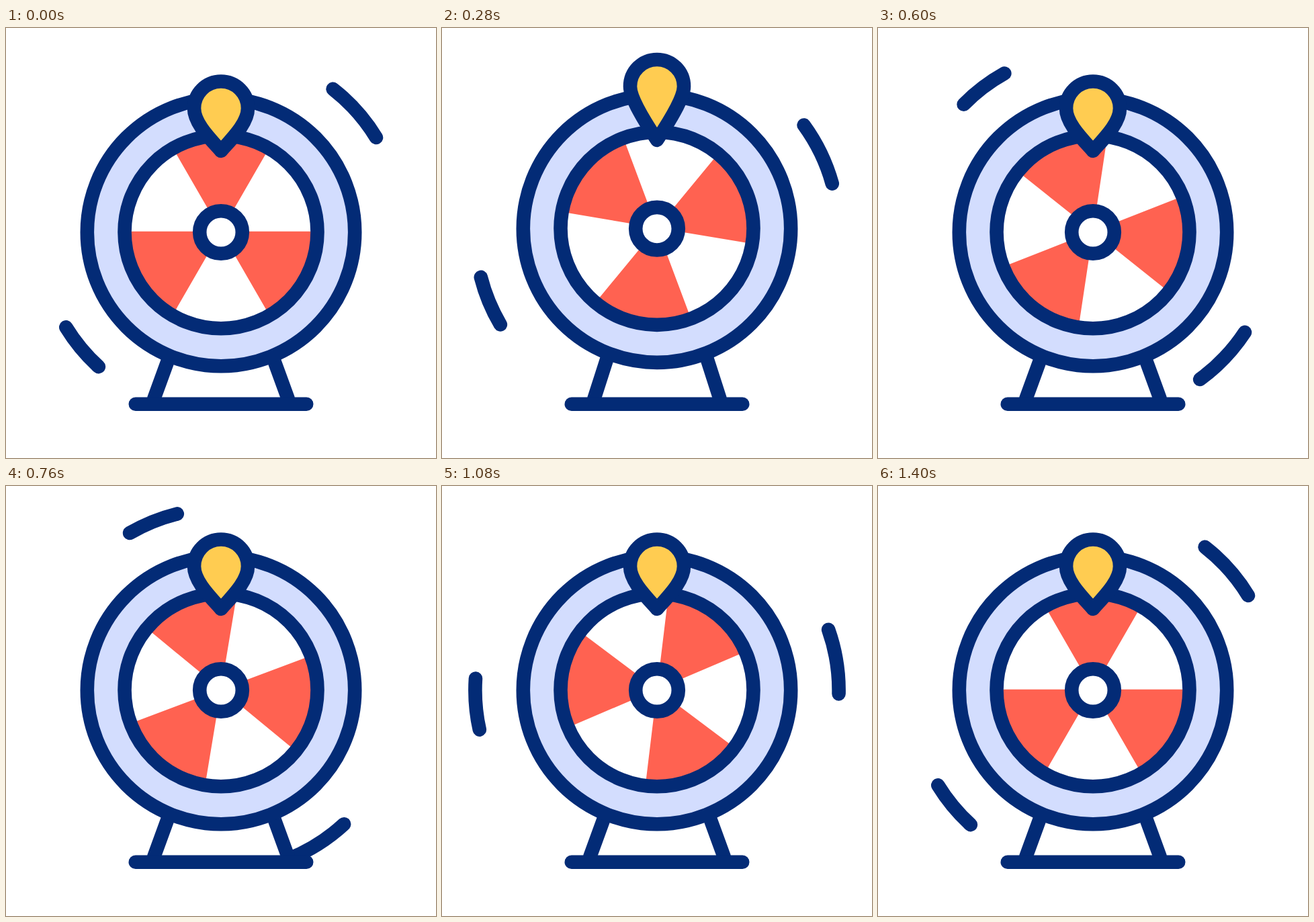
Animation of 640 by 640 pixels, one loop 1480 ms. Source, as an HTML page:

```html
<!DOCTYPE html>
<html lang="en">
<head>
<meta charset="utf-8">
<title>Prize wheel</title>
<style>
html, body { margin: 0; width: 100%; height: 100%; overflow: hidden; background: #fff; }
svg { display: block; width: 100vw; height: 100vh; }
.ink { stroke: #032b76; stroke-width: 20.6; stroke-linecap: round; stroke-linejoin: round; fill: none; }
</style>
</head>
<body>
<svg viewBox="0 0 640 640">
  <path class="ink" id="dashA"/>
  <path class="ink" id="dashB"/>
  <path class="ink" id="legs"/>
  <path class="ink" d="M192.8 559.8H447.2"/>
  <g id="wheel">
    <circle class="ink" cx="320" cy="304" r="199.2" style="fill:#d3ddfe"/>
    <circle cx="320" cy="303.7" r="143.5" fill="#fff"/>
    <path id="sectors" fill="#ff6251"/>
    <circle class="ink" cx="320" cy="303.7" r="143.5"/>
    <circle class="ink" cx="320" cy="304" r="31.8" style="fill:#fff"/>
  </g>
  <path class="ink" id="pin" style="fill:#ffcc51"/>
</svg>
<script>
const LOOP = 1480, STEP = 40;
const $ = id => document.getElementById(id);
const set = (id, name, value) => $(id).setAttribute(name, value);
const mix = (a, b, k) => a + (b - a) * k;

// Cubic easing with flat ends; x1 and x2 place its handles in time.
function ease(u, x1, x2) {
  if (u <= 0 || u >= 1) return u <= 0 ? 0 : 1;
  let lo = 0, hi = 1;
  for (let i = 0; i < 24; i++) {
    const m = (lo + hi) / 2, n = 1 - m;
    if (3 * n * n * m * x1 + 3 * n * m * m * x2 + m * m * m < u) lo = m; else hi = m;
  }
  return lo * lo * (3 - 2 * lo);
}

// Goes 0 -> 1 -> 0, with its own easing for each half.
function swing(t, peak, end, out, back) {
  return t < peak
    ? ease(t / peak, ...out)
    : 1 - ease((t - peak) / (end - peak), ...back);
}

function polar(cy, r, deg) {
  const a = deg * Math.PI / 180;
  return `${(320 + r * Math.cos(a)).toFixed(2)} ${(cy + r * Math.sin(a)).toFixed(2)}`;
}
const arc = (cy, r, from, to) => `M${polar(cy, r, from)}A${r} ${r} 0 0 1 ${polar(cy, r, to)}`;

function pinPath(k) {
  const y = mix(119.5, 69.2, k), tip = mix(183, 158, k);
  const side = y + mix(21.5, 15, k), low = tip - mix(20, 31, k);
  return `M280 ${y}A40 40 0 0 1 360 ${y}C360 ${side} 338 ${low} 320 ${tip}` +
    `C302 ${low} 280 ${side} 280 ${y}Z`;
}

function legPath(k) {
  const foot = mix(99.5, 90, k), slope = mix(0.365, 0.297, k);
  const leg = s => `M${320 + s * foot} 551L${320 + s * (foot - 71 * slope)} 480`;
  return leg(-1) + leg(1);
}

set('sectors', 'd', [-120, 0, 120].map(a =>
  arc(302.8, 140, a, a + 60) + 'L320 302.8Z').join(''));

function draw(t) {
  const hop = swing(t, 200, 400, [.33, .67], [.33, .67]);
  const spin = swing(t, 740, 1400, [.47, .01], [.227, .57]);
  const sweep = swing(t, 740, 1400, [.62, .7], [.22, .5]);
  const a = 100 * sweep, b = 108.2 * sweep;

  set('dashA', 'd', arc(304, 270.6, a - 52, a - 31.4));
  set('dashB', 'd', arc(304, 270.6, b + 132.3, b + 148.5));
  set('wheel', 'transform', `translate(0 ${-8.3 * hop})`);
  set('sectors', 'transform', `rotate(${100 * spin} 320 302.8)`);
  set('legs', 'd', legPath(hop));
  set('pin', 'd', pinPath(hop));
}

const start = performance.now();
function tick(now) {
  const t = Math.max(0, now - start) % LOOP;
  draw(Math.floor(t / STEP) * STEP);
  requestAnimationFrame(tick);
}
draw(0);
requestAnimationFrame(tick);
</script>
</body>
</html>
```
